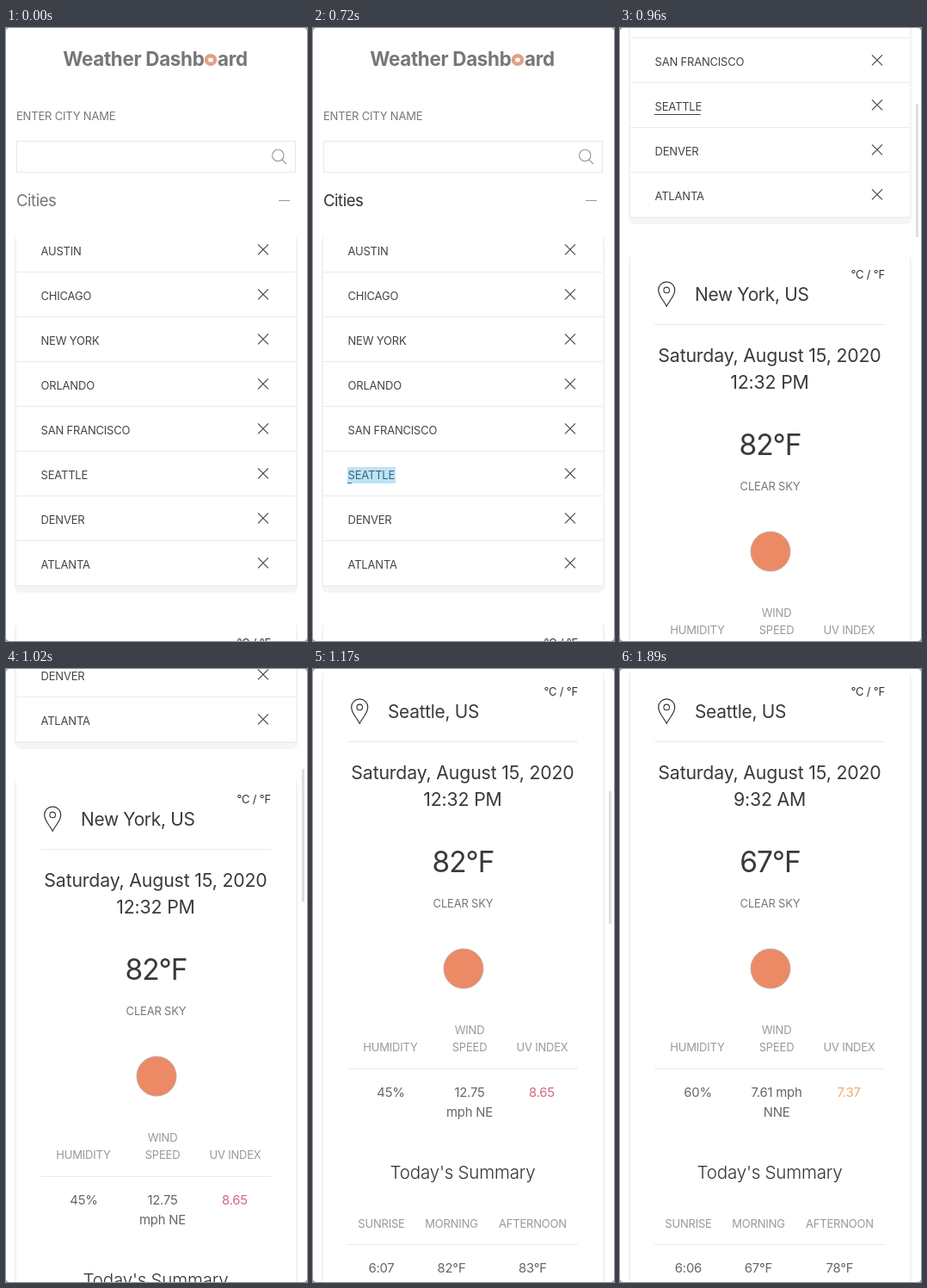
An HTML page that plays this animation: 350x712 px, repeating every 2430 ms.

```html
<!DOCTYPE html>
<html lang="en">
<head>
<meta charset="utf-8">
<title>Weather Dashboard</title>
<style>
  html, body { margin: 0; width: 100%; height: 100%; overflow: hidden; background: #8a8a8a; }
  svg { display: block; position: absolute; left: 0; top: 0; width: 350px; height: 712px; border-radius: 4px; background: #fff; }
  text { font-family: Inter, "Liberation Sans", sans-serif; white-space: pre; }
</style>
</head>
<body>
<svg id="stage" viewBox="0 0 350 712"></svg>
<script>
const LOOP = 2430, STEP = 30;
const stage = document.getElementById('stage');

function add(tag, attrs, parent = page) {
  const el = document.createElementNS('http://www.w3.org/2000/svg', tag);
  for (const key in attrs) el.setAttribute(key, attrs[key]);
  parent.appendChild(el);
  return el;
}
const page = add('g', {}, stage);

// Text style: size, letter spacing in em, colour
const styles = {
  caps: [13, -0.015, '#444'],
  label: [13, -0.015, '#777'],
  head: [13, -0.015, '#999'],
  value: [14.9, -0.015, '#666'],
  title: [21.3, -0.008, '#3a3a3a'],
  place: [20.9, -0.014, '#3a3a3a'],
  section: [20.6, -0.012, '#333'],
  temp: [33.5, -0.03, '#3a3a3a'],
  brand: [22.4, -0.014, '#777']
};
function label(str, x, y, style, anchor = 'start', extra = {}) {
  const [size, gap, fill] = styles[style];
  const el = add('text', {
    x, y, fill, 'font-size': size, 'letter-spacing': gap * size, 'text-anchor': anchor, ...extra
  });
  el.textContent = str;
  return el;
}
const mid = (str, x, y, style, extra) => label(str, x, y, style, 'middle', extra);
const path = (d, stroke, width = 1) => add('path', { d, stroke, 'stroke-width': width, fill: 'none' });
const rule = (x1, x2, y) => path(`M${x1} ${y}H${x2}`, '#ebebeb');

function card(y, h) {
  add('rect', { x: 9.5, y: y + 3, width: 330, height: h + 6, rx: 8, fill: '#f5f5f5' });
  add('rect', { x: 11, y: y + 2, width: 327, height: h, fill: '#f0f0f0' });
  add('rect', { x: 12, y, width: 325, height: h, fill: '#fff' });
}

// Header and search
label('Weather Dashb', 230.5, 44, 'brand', 'end', { 'font-weight': 700 });
label('ard', 246, 44, 'brand', 'start', { 'font-weight': 700 });
add('ellipse', { cx: 238, cy: 37, rx: 5.1, ry: 4.8, fill: 'none', stroke: '#e2a086', 'stroke-width': 4.4 });
label('ENTER CITY NAME', 12, 107, 'label');
add('rect', { x: 12.5, y: 131.5, width: 324, height: 36, fill: '#fff', stroke: '#e7e7e7' });
add('circle', { cx: 316.3, cy: 148, r: 6.7, fill: 'none', stroke: '#999', 'stroke-width': 1.1 });
path('M321 153L326 158', '#999', 1.1);

// City list
const cities = add('text', { x: 12, y: 206.5, 'font-size': 18.6, 'letter-spacing': -0.5 });
cities.textContent = 'Cities';
path('M317 200.5H330', '#999', 1.1);
card(240, 407);
const names = ['AUSTIN', 'CHICAGO', 'NEW YORK', 'ORLANDO', 'SAN FRANCISCO', 'SEATTLE', 'DENVER', 'ATLANTA'];
const rows = names.map((name, i) => {
  const y = 258 + i * 52;
  if (i) rule(12, 337, y - 26.5);
  path(`M293 ${y - 6.7}l12 12m0 -12l-12 12`, '#444', 1.1);
  return label(name, 40.5, y + 6, 'caps');
});
const underline = add('rect', { x: 40, y: 528, width: 0, height: 1, fill: '#444' });
const tap = add('rect', { x: 40, y: 510, width: 56, height: 19, fill: '#33a8e5' });

// Weather card
card(690, 900);
label('°C / °F', 308, 718.5, 'caps', 'end', { fill: '#333' });
path('M54.2 751.2C51 744.7 44.7 739.2 44.7 732.4a9.5 9.5 0 0 1 19 0C63.7 739.2 57.4 744.7 54.2 751.2Z', '#333', 1.2);
add('circle', { cx: 54.2, cy: 732.4, r: 3.3, fill: 'none', stroke: '#333', 'stroke-width': 1.1 });
const place = label('', 87, 745, 'place');
rule(40, 308, 772.5);
mid('Saturday, August 15, 2020', 174, 815.5, 'title');
const clock = mid('', 174, 846.5, 'title');
const temp = mid('', 174.5, 923.5, 'temp');
mid('CLEAR SKY', 174.5, 965, 'label');
add('circle', { cx: 175, cy: 1036, r: 23, fill: '#ec8a66', stroke: '#bfaaa2', 'stroke-width': 1 });

mid('WIND', 182, 1112, 'head');
[['HUMIDITY', 90], ['SPEED', 182], ['UV INDEX', 266.5]].forEach(([s, x]) => mid(s, x, 1132, 'head'));
rule(40, 308, 1152.5);
const humidity = mid('', 90.5, 1185, 'value');
const wind = mid('', 182, 1185, 'value');
const windDir = mid('', 182, 1208, 'value');
const uv = mid('', 266, 1185, 'value');

mid("Today's Summary", 174, 1280, 'section', { 'font-weight': 300 });
[['SUNRISE', 79.5], ['MORNING', 161], ['AFTERNOON', 255.5]].forEach(([s, x]) => mid(s, x, 1337, 'head'));
rule(40, 308, 1356.5);
const sunrise = mid('', 79.5, 1389, 'value');
const morning = mid('', 161, 1389, 'value');
const noon = mid('', 255.5, 1389, 'value');

const bar = add('rect', { x: 344, width: 3, height: 155, rx: 1.5, fill: '#dedede' }, stage);

// Each entry: element, moment of change, text before, text after
const swaps = [
  [place, 1050, 'New York, US', 'Seattle, US'],
  [temp, 1350, '82°F', '67°F'],
  [humidity, 1350, '45%', '60%'],
  [wind, 1350, '12.75', '7.61 mph'],
  [windDir, 1350, 'mph NE', 'NNE'],
  [uv, 1410, '8.65', '7.37'],
  [morning, 1410, '82°F', '67°F'],
  [noon, 1410, '83°F', '78°F'],
  [clock, 1560, '12:32 PM', '9:32 AM'],
  [sunrise, 1560, '6:07', '6:06']
];

// Scroll offset for every step from 720 ms on
const scrolls = [0, 16, 45, 88, 141, 208, 280, 354, 428, 499, 563, 615, 656, 677, 685, 688];
const clamp = (v, lo, hi) => Math.min(hi, Math.max(lo, v));
const easeOut = u => 1 - Math.pow(1 - u, 2);

function draw(t) {
  const y = scrolls[clamp((t - 720) / STEP, 0, scrolls.length - 1)];
  page.setAttribute('transform', `translate(0 ${-y})`);
  bar.setAttribute('y', 0.8 + y * 0.204);
  bar.setAttribute('opacity', t < 750 || t >= 1890 ? 0 : t >= 1800 ? 0.45 : 1);

  cities.setAttribute('fill', t >= 720 ? '#333' : '#777');
  underline.setAttribute('width', 55 * easeOut(clamp((t - 706) / 300, 0, 1)));
  tap.setAttribute('opacity', 0.32 * clamp((t - 420) / 90, 0, 1) * clamp((780 - t) / 60, 0, 1));

  for (const [el, at, before, after] of swaps) {
    const str = t < at ? before : after;
    if (el.textContent !== str) el.textContent = str;
  }
  uv.setAttribute('fill', t < 1410 ? '#d5647f' : '#efab70');
}

function frame() {
  draw(Math.floor((performance.now() % LOOP) / STEP) * STEP);
  requestAnimationFrame(frame);
}
frame();
</script>
</body>
</html>
```
